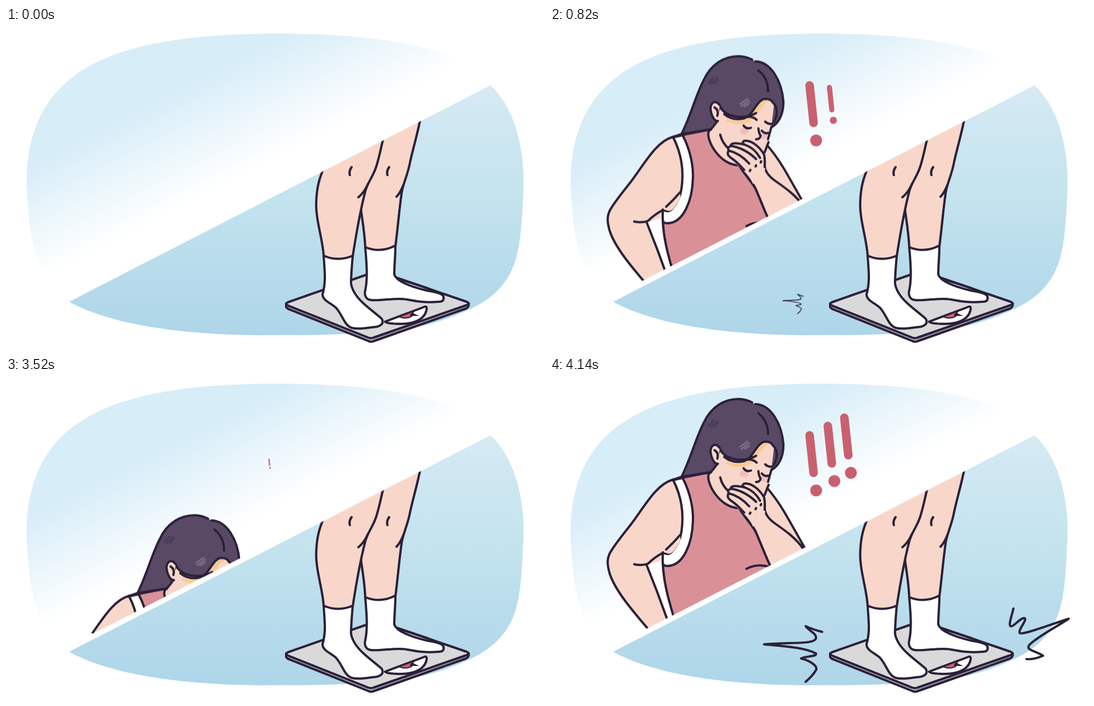
An HTML page for the animation above (6000 ms loop, 945x567 px).

```html
<!DOCTYPE html>
<html lang="en">
<head>
<meta charset="utf-8">
<title>Shock on the scale</title>
<style>
  html, body { margin: 0; width: 100%; height: 100%; overflow: hidden; background: #fff; }
  svg { display: block; width: 100%; height: 100%; }

  .line { fill: none; stroke: #2a2138; stroke-width: 4; stroke-linecap: round; stroke-linejoin: round; }
  .ink { stroke: #2a2138; stroke-width: 4; stroke-linecap: round; stroke-linejoin: round; }
  .skin { fill: #f8d7ca; }
  .white { fill: #fff; }
  .pink { fill: #da9097; }
  .hair { fill: #594964; }
  .red { fill: #c9606f; }

  /* One cycle lasts 3 s. */
  .woman, .pop { animation: 3s linear infinite; }
  .woman { animation-name: rise; }
  .mark1 { animation-name: mark1; }
  .mark2 { animation-name: mark2; }
  .mark3 { animation-name: mark3; }
  .burst1 { animation-name: burst1; }
  .burst2 { animation-name: burst2; }

  @keyframes rise {
    0%, 10% { transform: translateY(347px); animation-timing-function: cubic-bezier(.36, 0, .31, 1); }
    32%, 100% { transform: translateY(0); }
  }
  @keyframes mark1 { 0%, 16.07% { transform: scale(0); } 24.53%, 100% { transform: scale(1); } }
  @keyframes mark2 { 0%, 22.3% { transform: scale(0); } 30.77%, 100% { transform: scale(1); } }
  @keyframes mark3 { 0%, 29% { transform: scale(0); } 37.45%, 100% { transform: scale(1); } }
  @keyframes burst1 { 0%, 24.4% { transform: scale(0); } 32.85%, 100% { transform: scale(1); } }
  @keyframes burst2 { 0%, 29.55% { transform: scale(0); } 38%, 100% { transform: scale(1); } }
</style>
</head>
<body>
<svg viewBox="0 0 945 567">
  <defs>
    <linearGradient id="sky" gradientUnits="userSpaceOnUse" x1="108" y1="209" x2="193" y2="374">
      <stop offset="0" stop-color="#d7edf8"/>
      <stop offset="1" stop-color="#fff"/>
    </linearGradient>
    <linearGradient id="floor" gradientUnits="userSpaceOnUse" x1="0" y1="101" x2="0" y2="541">
      <stop offset="0" stop-color="#d6eaf4"/>
      <stop offset=".45" stop-color="#c3e3ee"/>
      <stop offset="1" stop-color="#aed5e9"/>
    </linearGradient>
    <clipPath id="upper"><path d="M0 0H700V169L447 299 153 450 100 435 0 405Z"/></clipPath>
    <clipPath id="lower"><path d="M111 482L851 101 945 53V567H111Z"/></clipPath>
    <g id="mark">
      <path d="M-7 -50L0 16" fill="none" stroke="#c9606f" stroke-width="15" stroke-linecap="round"/>
      <circle class="red" cx="4.5" cy="47" r="10.5"/>
    </g>
  </defs>

  <!-- panels -->
  <path fill="url(#sky)" d="M36 275C36 70 190 10 480 10C610 10 720 24 787 52L851 101 111 482C50 440 40 370 36 275Z"/>
  <path fill="url(#floor)" d="M111 482L851 101C893 140 911 210 909 280C906 350 903 395 889 425C868 470 830 497 735 524C690 533 640 538 590 539C550 541 500 541 450 541C360 541 200 532 111 482Z"/>

  <!-- scale -->
  <path class="ink" fill="#aaa8b6" d="M492 485V491Q493 494 499 496L636 551Q641 554 647 551L808 494Q813 492 813 485Z"/>
  <path class="ink" fill="#d9d9da" d="M495 483L643 431Q652 428 661 431L809 482Q816 485 809 488L646 545Q641 547 636 545L496 489Q489 486 495 483Z"/>
  <path class="ink white" d="M666 517L735 491Q739 489 739 494C737 512 718 521 695 521C680 521 671 520 667 518Z"/>
  <path class="red" stroke="#2a2138" stroke-width="2" d="M691 508L715 499Q717 508 707 510Q696 512 691 508Z"/>
  <path fill="#2a2138" d="M712 501L726 507 709 507Z"/>

  <!-- legs -->
  <g clip-path="url(#lower)">
    <path class="skin" d="M661 190L730 155C722 190 715 212 710 235C706 258 697 275 695 290C690 325 688 355 684 385Q658 397 631 386C630 360 626 340 623 316L634 275Z"/>
    <path class="line" d="M729 155C722 190 715 212 710 235C706 258 697 275 695 290C690 325 688 355 684 384M623 316C626 340 630 360 631 386M673 245Q668 252 670 259M686 297Q693 290 699 274"/>
    <path class="skin" d="M560 240L664 188C658 215 655 230 650 245C644 263 636 270 631 288C620 330 615 365 609 402Q583 412 558 402C556 370 543 335 545 305C546 280 550 265 560 240Z"/>
    <path class="line" d="M560 242C550 265 546 280 545 305C543 335 556 370 558 401M664 188C658 215 655 230 650 245C644 263 636 270 631 288C620 330 615 365 609 402M607 245Q602 252 604 259M619 298Q629 290 636 274"/>
  </g>
  <path class="ink white" d="M631 386Q658 397 684 383C684 402 682 418 682 434C686 446 712 456 738 462C752 465 764 466 768 472C770 478 768 482 760 482C735 484 720 481 704 478C685 474 660 481 641 479C632 478 629 470 631 462C636 440 633 410 631 386Z"/>
  <path class="line" d="M688 441L740 458 766 468"/>
  <path class="ink white" d="M558 401Q583 412 609 401C607 425 606 437 606 450C608 462 617 475 628 485C640 496 650 503 660 512C664 519 660 524 651 526C635 528 620 531 607 528C594 523 592 507 580 493C572 485 556 480 556 469C563 445 559 422 558 401Z"/>

  <!-- woman -->
  <g clip-path="url(#upper)">
    <g class="woman">
      <path class="hair" d="M231 175C247 142 256 106 270 79C283 50 308 36 333 37Q346 38 356 44L362 46C388 47 407 80 410 117C410 142 400 156 389 162L300 190Z"/>
      <path class="line" d="M284 166L231 174C247 142 256 106 270 79C283 50 308 36 333 37Q346 38 355 43M361 46C388 47 407 80 410 117C410 142 400 156 389 162"/>

      <!-- arms and top -->
      <path class="skin" d="M378 190C395 209 405 225 411 235L455 314 380 350 340 237Z"/>
      <path class="ink pink" d="M215 179L281 166C275 185 300 228 332 229C345 250 356 260 362 272C374 300 380 317 389 335L400 440H222C210 400 198 360 198 320Z"/>
      <path class="skin" d="M355 235L377 230Q377 243 395 256C415 270 432 282 446 303L388 334C376 305 364 266 345 245Z"/>
      <path class="line" d="M340 236C349 255 356 258 362 272C374 300 380 317 389 335M380 192C395 209 405 225 411 235Q425 259 449 302M377 228Q377 243 395 256C415 270 432 282 445 301M345 336Q364 326 387 333"/>
      <path class="white" d="M168 330L198 307C197 340 208 390 222 430L208 432Z"/>
      <path class="line" d="M198 308C196 350 208 390 220 430"/>
      <path class="skin" d="M216 179C186 187 165 228 142 258C128 276 118 288 109 302C99 316 100 328 105 345C115 375 145 410 174 444L209 430 170 330 200 320Q222 312 229 295L233 215Z"/>
      <path class="ink white" d="M215 180L233 176C247 203 252 232 251 252C250 290 235 331 206 331Q198 331 198 325V307Q207 313 214 306Q228 292 231 270C236 235 229 205 217 181Z"/>
      <path class="skin" d="M200 307L229 276V287Q216 312 207 309Z"/>
      <path class="line" d="M216 179C186 187 165 228 142 258C128 276 118 288 109 302C99 316 100 328 105 345C115 375 145 410 174 444M148 328Q162 331 172 327Q183 316 198 308M170 330L188 376 207 428M229 276Q217 290 204 302"/>

      <!-- neck and face -->
      <path class="skin" d="M290 148L302 125 375 108 394 118 389 160 382 190 358 225 330 229C302 226 272 192 281 168L294 152Z"/>
      <path class="line" d="M294 151Q286 163 279 169C273 184 298 229 332 229M389 161L383 183M299 175Q302 189 314 200"/>
      <path class="hair" d="M277 95L345 55 402 95 398 145 389 161Q400 128 391 118Q387 112 378 112C366 113 360 128 350 140C335 149 317 148 303 134L290 116Z"/>
      <path fill="#f9c98f" d="M310 147C325 154 345 152 354 141C364 129 370 114 381 114L386 116C376 119 369 131 363 141C352 158 328 161 310 151Z"/>
      <path class="line" d="M299 126C309 145 341 149 362 137M306 139C322 152 342 149 351 140C361 128 367 113 378 112Q388 112 391 118C399 125 399 133 398 140Q397 147 393 153M366 62Q383 75 383 99"/>
      <path class="ink skin" d="M298 123C289 111 279 121 283 136C286 147 291 152 295 151"/>
      <path class="line" d="M289 127Q297 132 294 142"/>
      <path fill="none" stroke="#453c5b" stroke-width="3" stroke-linecap="round" d="M279 84L288 74M283 86L294 75M288 86L295 79"/>
      <path fill="none" stroke="#7d6d85" stroke-width="3" stroke-linecap="round" d="M334 121L347 112M336 125L350 115M342 125L350 120"/>
      <g fill="#f0bdc2">
        <ellipse cx="341" cy="169" rx="8" ry="6"/>
        <ellipse cx="376" cy="177" rx="6" ry="6"/>
      </g>
      <path class="line" d="M346 144Q355 142 363 149M378 152Q383 157 390 156M340 159Q345 166 353 163M372 168Q377 174 383 172M366 164Q367 173 370 177Q368 184 362 183"/>

      <!-- hand -->
      <path class="skin" d="M313 206C311 194 319 188 332 192L340 187C356 182 369 197 375 207L384 188 376 212 378 237 357 262C348 243 334 233 323 223Q311 214 313 206Z"/>
      <path class="line" d="M384 188L377 206M377 232Q378 219 376 210C369 198 355 184 341 186Q335 190 343 193C357 198 364 207 369 216M343 193C328 189 318 189 317 195C332 196 350 206 362 218M317 195Q311 198 314 203C330 207 342 217 350 226M314 203Q309 210 318 216C330 224 334 230 341 237"/>
      <path class="line" d="M351 239L352 237M361 231L362 229M370 224L371 222"/>

      <path class="line" d="M214 180L231 174 283 166"/>
    </g>
  </g>

  <!-- exclamation marks -->
  <g transform="translate(463 151)"><use class="pop mark1" href="#mark"/></g>
  <g transform="translate(495 134.5)"><use class="pop mark2" href="#mark"/></g>
  <g transform="translate(524 120)"><use class="pop mark3" href="#mark"/></g>

  <!-- impact lines -->
  <g transform="translate(427 486)">
    <path class="pop burst1 line" d="M51 -39Q35 -43 22 -49C28 -40 42 -37 40 -27C36 -17 0 -21 -51 -17C-20 -14 20 -12 40 -1C43 5 22 3 14 8C25 10 42 19 41 27Q35 38 22 49"/>
  </g>
  <g transform="translate(860 451)">
    <path class="pop burst2 line" d="M-46 -45C-49 -32 -55 -16 -51 -14C-46 -12 -32 -31 -26 -28C-22 -24 -38 -8 -35 -2C-30 2 10 -14 51 -27C25 -10 -6 6 -18 19C-26 29 -4 30 6 38Q-10 45 -23 44"/>
  </g>
</svg>
</body>
</html>
```
